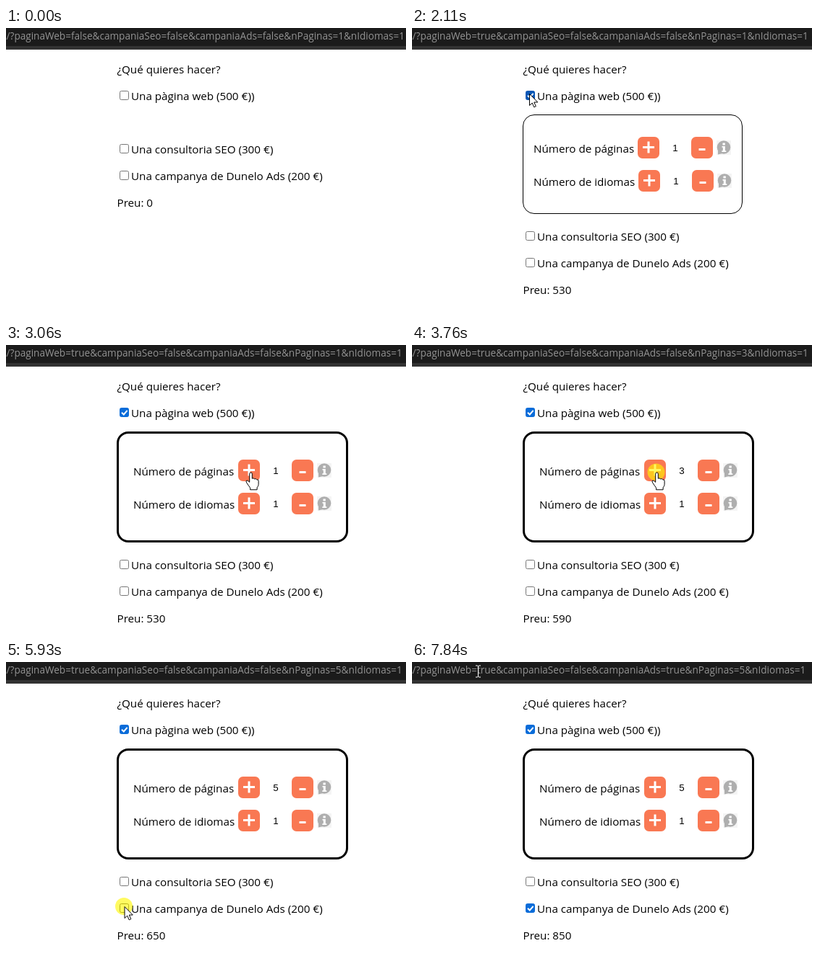
An HTML page that plays this animation: 553 by 401 pixels, repeating every 8 s.

```html
<!DOCTYPE html>
<html lang="ca">
<head>
<meta charset="utf-8">
<title>Pressupost</title>
<style>
  html, body { margin: 0; width: 100%; height: 100%; overflow: hidden; background: #fff; }
  svg { display: block; width: 553px; height: 401px; }
  text { font: 15.2px "Open Sans", "Noto Sans", sans-serif; fill: #000; }
  #url { font-size: 13.57px; fill: #939393; }
  .count { font: 13.3px "Liberation Sans", Arial, sans-serif; text-anchor: middle; }
  .sign { stroke: #fff; stroke-width: 3; fill: none; }
  .pointer { fill: #fff; stroke: #000; stroke-linejoin: round; }
</style>
</head>
<body>
<svg viewBox="0 0 553 401">
  <defs>
    <g id="stepper">
      <rect width="30" height="30" rx="6.5" fill="#f97853"/>
      <path class="sign" d="M7 14.5h16M15 6.5v16"/>
      <rect x="74" width="30" height="30" rx="6.5" fill="#f97853"/>
      <path class="sign" d="M84.5 17.5h9"/>
      <rect x="109" y="5" width="20" height="20" fill="#f4f4f4"/>
      <circle cx="119" cy="14.5" r="9.3" fill="#aeaeae"/>
      <path d="M111 18v6.5l6-1.5z" fill="#aeaeae"/>
      <path d="M117.5 8.5h3.3v3h-3.3zM116.5 13h4.3v6.2h1.5v1.8h-6v-1.8h1.5v-4.4h-1.3z" fill="#fff"/>
    </g>
  </defs>
  <rect width="553" height="30" fill="#323232"/>
  <rect width="553" height="25" fill="#1b1b1b"/>
  <text id="url" x=".6" y="16"></text>
  <text x="153.5" y="63">¿Qué quieres hacer?</text>
  <g id="web" class="option"><text x="173" y="6">Una pàgina web (500 €))</text></g>
  <g id="card">
    <rect id="frame" fill="none" stroke="#000"/>
    <g id="pagesRow">
      <text y="38">Número de páginas</text>
      <g><use href="#stepper" y="16"/><text id="pages" class="count" x="52" y="36"></text></g>
    </g>
    <g id="languagesRow">
      <text y="38">Número de idiomas</text>
      <g><use href="#stepper" y="16"/><text class="count" x="52" y="36">1</text></g>
    </g>
  </g>
  <g id="seo" class="option"><text x="173" y="6">Una consultoria SEO (300 €)</text></g>
  <g id="ads" class="option"><text x="173" y="6">Una campanya de Dunelo Ads (200 €)</text></g>
  <text id="price" x="153.5"></text>
  <circle id="halo" r="12" fill="#fff700" opacity=".62"/>
  <g id="cursor">
    <path id="arrow" class="pointer" d="M0 0v16l3.7-3.5 2.5 5.8 2.6-1.1-2.5-5.7h5z"/>
    <path id="hand" class="pointer" d="M-1.8 1.8a1.8 1.8 0 0 1 3.6 0v6.5q1.7-1.4 3.3.6 1.8-1 3 .9 2.5-.6 2.5 2v4.5q0 2.5-2 4.5v3h-9.5v-2.5q-2-3-4.5-6.5-2-2.8-.5-3.8 1.6-.7 4.1 2.4z"/>
    <path id="beam" fill="none" d="M-3.5-8h2.5l1 1 1-1h2.5M0-7v14M-3.5 8h2.5l1-1 1 1h2.5"/>
  </g>
</svg>
<script>
const LOOP = 8000, TICK = 68.3;
const $ = id => document.getElementById(id);
const set = (el, attrs) => { for (const k in attrs) el.setAttribute(k, attrs[k]); };
const show = (el, on) => set(el, { visibility: on ? 'visible' : 'hidden' });
const move = (el, x, y) => set(el, { transform: `translate(${x} ${y})` });
const easeOut = p => 1 - (1 - p) ** 3;
const smooth = p => p * p * (3 - 2 * p);
const linear = p => p;
const within = (v, lo, hi) => v >= lo && v <= hi;

// Cursor path: time, x, y, easing towards this point
const path = [
  [400, 462, 361], [900, 171, 85, easeOut],
  [1165, 171, 85], [1430, 162.5, 91.5, smooth],
  [2525, 162.5, 91.5], [3050, 338.5, 177, smooth],
  [4365, 338.5, 177], [4640, 213, 299, linear], [5195, 166, 342, easeOut],
  [5205, 166, 342], [5390, 164, 339.5, linear],
  [6475, 164, 339.5], [6750, 35, 46, smooth],
  [6945, 35, 46], [7080, 24, 54, linear], [7180, 4, 13, linear],
  [7430, 536, 12, smooth], [7700, 130, 4, smooth], [7830, 91.5, 13, linear]
];
// Pressed and released times of each click
const clicks = [[1840, 1980], [3230, 3350], [3480, 3600], [3730, 3850], [3980, 4100], [5930, 6060]];

document.querySelectorAll('.option').forEach(option => {
  option.insertAdjacentHTML('afterbegin',
    '<rect x="157.5" y="-6.5" width="12" height="12" rx="2"/>' +
    '<path d="M160 -.3l2.8 2.8 4.8-5.6" fill="none" stroke="#fff" stroke-width="2"/>');
});

function cursorAt(t) {
  const next = path.findIndex(point => point[0] > t);
  if (next === 0) return path[0].slice(1, 3);
  if (next < 0) return path[path.length - 1].slice(1, 3);
  const [t0, x0, y0] = path[next - 1], [t1, x1, y1, ease = linear] = path[next];
  const p = ease((t - t0) / (t1 - t0));
  return [x0 + (x1 - x0) * p, y0 + (y1 - y0) * p];
}

function drawOption(id, y, checked, cx, cy) {
  const [box, tick] = $(id).children;
  const hover = within(cx, 157, 170) && within(cy, y - 7, y + 7);
  const blue = hover ? '#0a57b5' : '#0a6cd9';
  move($(id), 0, y);
  set(box, { fill: checked ? blue : '#fff', stroke: checked ? blue : hover ? '#484848' : '#767676' });
  show(tick, checked);
}

// Boxes snap to whole pixels, as in page layout
function drawCard(grown) {
  const border = Math.floor(3 * grown ** 1.5 + 1e-6);
  const inset = border + 20 * grown;
  const width = Math.round(274 + 2 * inset);
  const bottom = Math.round(228 + 2 * inset);
  set($('frame'), {
    x: 153 + border / 2, y: 120 + border / 2,
    width: width - border, height: bottom - 120 - border,
    rx: 16 - border / 2, 'stroke-width': border
  });
  const left = 153 + inset, top = Math.round(120 + inset);
  const drawRow = (id, y, labelWidth) => {
    move($(id), Math.round(left), y);
    move($(id).lastElementChild, Math.round(left + labelWidth) - Math.round(left), 0);
  };
  drawRow('pagesRow', top, 144.55);
  drawRow('languagesRow', top + 46, 145);
  return Math.round(91.2 + 2 * inset);
}

function cursorKind(x, y, shift, open) {
  if (y < 25) return 'beam';
  if (open && (within(x, 321, 351) || within(x, 395, 425)) &&
      (within(y, 159, 189) || within(y, 205, 235))) return 'hand';
  const overText = (left, right, mid) => within(x, left, right) && within(y, mid - 10, mid + 10);
  const rows = [[173, 345, 94], [173, 369, 168 + shift], [173, 439, 205 + shift], [153, 218, 242 + shift]];
  if (open) rows.push([176, 316, 174], [176, 316, 220]);
  return rows.some(row => overText(...row)) ? 'beam' : 'arrow';
}

function render(t) {
  const tick = Math.floor((t + 20) / TICK) * TICK;
  const released = clicks.filter(click => t >= click[1]).length;
  const web = released > 0, ads = released > 5;
  const pages = 1 + Math.min(4, Math.max(0, released - 1));

  const grown = easeOut(Math.min(1, Math.max(0, (tick - 1985) / 405)));
  const shift = web ? drawCard(grown) : 0;
  show($('card'), web);
  $('pages').textContent = pages;

  const [x, y] = cursorAt(tick);
  drawOption('web', 94, web, x, y);
  drawOption('seo', 168 + shift, false, x, y);
  drawOption('ads', 205 + shift, ads, x, y);
  $('price').textContent = `Preu: ${web ? 500 + 30 * pages + (ads ? 200 : 0) : 0}`;
  set($('price'), { y: 248 + shift });
  $('url').textContent =
    `/?paginaWeb=${web}&campaniaSeo=false&campaniaAds=${ads}&nPaginas=${pages}&nIdiomas=1`;

  const visible = t >= 410 && !within(t, 7765, 7835);
  const kind = cursorKind(x, y, shift, web);
  for (const id of ['arrow', 'hand', 'beam']) show($(id), visible && id === kind);
  set($('beam'), { stroke: y < 30 ? '#fff' : '#000' });
  move($('cursor'), x, y);
  show($('halo'), clicks.some(([down, up]) => t >= down && t < up));
  move($('halo'), x - 1, y - .5);
}

const start = performance.now();
function frame() {
  render((performance.now() - start) % LOOP);
  requestAnimationFrame(frame);
}
frame();
</script>
</body>
</html>
```
